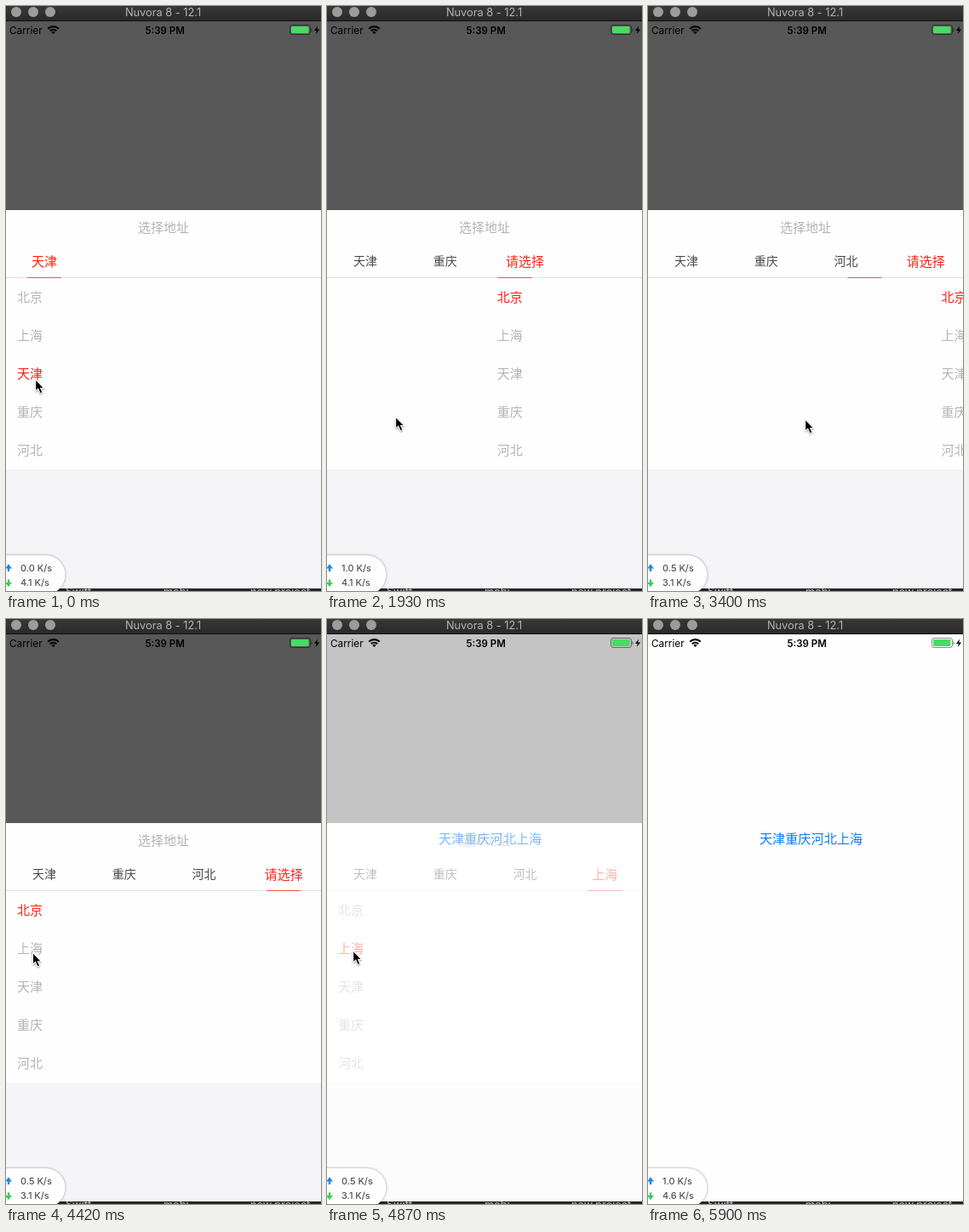
Recreate the animation shown at these times as an HTML page with a canvas. Size 370 px wide and 688 px high, loop 6050 ms.

```html
<!DOCTYPE html>
<html lang="zh">
<head>
<meta charset="utf-8">
<title>选择地址</title>
<style>
  html, body { margin: 0; width: 100%; height: 100%; overflow: hidden; background: #fefefe; }
  canvas { display: block; width: 370px; height: 688px; }
</style>
</head>
<body>
<canvas id="stage"></canvas>
<script>
const W = 370, H = 688, LOOP = 6050;
const STEP = 147.5;                  // the picture refreshes once per step
const SLIDE = 297, MARKER = 190, FADE = 300;
const canvas = document.getElementById('stage');
const ctx = canvas.getContext('2d');
const ratio = window.devicePixelRatio || 1;
canvas.width = W * ratio;
canvas.height = H * ratio;

const LATIN = 'Inter, "Liberation Sans", sans-serif';
const CJK = '"Noto Sans CJK SC", "Noto Sans CJK", "Noto Sans CJK JP", sans-serif';
const RED = '#ff2218', GREY = '#b4b4b4';
const CITIES = ['北京', '上海', '天津', '重庆', '河北'];
const PROMPT = '请选择';

// One pick per level: the row, the step it happens on, the wait before the sheet moves.
const PICKS = [
  { row: 2, at: 0, wait: 33 },
  { row: 3, at: 12 * STEP, wait: 0 },
  { row: 4, at: 22 * STEP, wait: 88 },
  { row: 1, at: 32 * STEP, wait: Infinity }
];
const CLOSE_AT = PICKS[3].at - 33;

// Key points of the pointer tip
const POINTER = [
  { t: 0, x: 35, y: 440 }, { t: 5 * STEP, x: 42, y: 447 },
  { t: 12 * STEP, x: 31, y: 479 }, { t: 13 * STEP, x: 81, y: 484 },
  { t: 16 * STEP, x: 47, y: 471 }, { t: 22 * STEP, x: 29, y: 522 },
  { t: 23 * STEP, x: 185, y: 487 }, { t: 29 * STEP, x: 32, y: 394 },
  { t: 33 * STEP, x: 31, y: 391 }, { t: 40 * STEP, x: 397, y: 733 }
];

const UP = ['0.0', '1.0', '0.5', '1.0'];
const DOWN = ['4.1', '4.1', '3.1', '4.6'];

const clamp = v => Math.max(0, Math.min(1, v));
const mix = (a, b, k) => a + (b - a) * k;
const ease = v => { v = clamp(v); return v * v * (3 - 2 * v); };
const tabX = i => 45 + i * 93.75;
const rowY = i => 342 + i * 45;

function rect(x, y, w, h, color) {
  ctx.fillStyle = color;
  ctx.fillRect(x, y, w, h);
}

function roundRect(x, y, w, h, r) {
  ctx.beginPath();
  ctx.roundRect(x, y, w, h, r);
}

function polygon(points, color) {
  ctx.beginPath();
  points.forEach(([x, y]) => ctx.lineTo(x, y));
  ctx.closePath();
  ctx.fillStyle = color;
  ctx.fill();
}

function text(str, x, y, size, color, { align = 'left', font = LATIN, weight = 400 } = {}) {
  ctx.font = `${weight} ${size}px ${font}`;
  ctx.textAlign = align;
  ctx.fillStyle = color;
  ctx.fillText(str, x, y);
}

// Chinese text placed by its vertical middle
function hanzi(str, x, midY, size, color, align = 'center') {
  text(str, x, midY + size * 0.38, size, color, { align, font: CJK });
}

function drawTitleBar() {
  const shade = ctx.createLinearGradient(0, 0, 0, 17);
  shade.addColorStop(0, '#383838');
  shade.addColorStop(1, '#2a2a2a');
  rect(0, 0, W, 17, shade);
  rect(0, 17, W, 1, '#111');
  for (let i = 0; i < 3; i++) {
    ctx.beginPath();
    ctx.arc(12 + i * 20, 7, 6, 0, 7);
    ctx.fillStyle = '#9c9c9c';
    ctx.fill();
  }
  text('Nuvora 8 - 12.1', 184.5, 12, 12.8, '#b4b4b4', { align: 'center' });
}

function drawWifi(x, y) {
  const from = -Math.PI * 0.75, to = -Math.PI * 0.25;
  ctx.strokeStyle = ctx.fillStyle = '#000';
  ctx.lineWidth = 2.2;
  for (const r of [5.2, 8.8]) {
    ctx.beginPath();
    ctx.arc(x, y, r, from, to);
    ctx.stroke();
  }
  ctx.beginPath();
  ctx.moveTo(x, y);
  ctx.arc(x, y, 3, from, to);
  ctx.fill();
}

function drawBattery() {
  const shell = 'rgba(0,0,0,.45)';
  roundRect(333.5, 22.5, 24, 11, 2.6);
  ctx.strokeStyle = shell;
  ctx.lineWidth = 1;
  ctx.stroke();
  roundRect(335, 24, 20.5, 8, 1.4);
  ctx.fillStyle = '#4cd964';
  ctx.fill();
  rect(358.3, 26.5, 1.2, 3.4, shell);
  polygon([[366.2, 23.5], [362, 29], [364.8, 29], [363.8, 33], [368.2, 27.4], [365.3, 27.4]], '#000');
}

function drawStatusBar() {
  text('Carrier', 4, 32.5, 11.8, '#000');
  drawWifi(55.5, 33);
  text('5:39 PM', 186.7, 32.5, 11.5, '#000', { align: 'center', weight: 600 });
  drawBattery();
}

function drawSheet(t) {
  const level = PICKS.filter(p => p.at <= t).length - 1;
  const { row, at, wait } = PICKS[level];
  const elapsed = t - at - wait;
  const moved = elapsed > 0;
  const active = moved ? level + 1 : level;

  rect(0, 18, W, 222, 'rgba(0,0,0,.65)');
  rect(0, 240, W, 305, '#fefefe');
  rect(0, 545, W, H - 545, '#f5f5f7');
  hanzi('选择地址', 185, 260, 15, GREY);

  for (let i = 0; i < active; i++) {
    hanzi(CITIES[PICKS[i].row], tabX(i), 300, 14, '#4a4a4a');
  }
  hanzi(moved ? PROMPT : CITIES[row], tabX(active), 300, 15, RED);

  const marker = tabX(level + ease(elapsed / MARKER));
  rect(0, 319, W, 1, '#e2e2e2');
  rect(marker - 20, 319, 40, 1, '#ff5045');

  const shift = moved ? W * (1 - ease(elapsed / SLIDE)) : 0;
  const chosen = moved ? 0 : row;
  CITIES.forEach((city, i) => {
    hanzi(city, 13 + shift, rowY(i), 15, i === chosen ? RED : GREY, 'left');
  });
}

function drawAddress(t) {
  const address = PICKS.map(p => CITIES[p.row]).join('');
  ctx.globalAlpha = ease((t - CLOSE_AT) / 250);
  hanzi(address, 191.5, 258, 15.15, '#0a7dfa');
  ctx.globalAlpha = 1;
}

function drawDesktopEdge() {
  const style = { weight: 500 };
  ctx.save();
  ctx.beginPath();
  ctx.rect(0, 685, W, 3);
  ctx.clip();
  rect(0, 685, W, 3, '#252527');
  text('Swift', 70, 693, 12.5, '#b0b0b0', style);
  text('mobi', 185, 693, 12.5, '#b0b0b0', style);
  text('new project', 287, 693, 12.5, '#b0b0b0', style);
  ctx.restore();
}

function drawArrow(y, dir, color) {
  polygon([[-1.2, y + 0.6 * dir], [3, y - 4 * dir], [7.2, y + 0.6 * dir]], color);
  rect(1.8, y - 4, 2.4, 8, color);
}

function drawSpeed(t) {
  const reading = Math.floor((t + 115) / 1745);
  ctx.save();
  ctx.shadowColor = 'rgba(0,0,0,.4)';
  ctx.shadowBlur = 3 * ratio;
  roundRect(-40, 646, 109.5, 46, 23);
  ctx.fillStyle = '#fefefe';
  ctx.fill();
  ctx.restore();
  drawArrow(661, 1, '#1689e6');
  drawArrow(678.5, -1, '#35cf55');
  text(UP[reading] + ' K/s', 17, 665, 10.9, '#505050', { weight: 500 });
  text(DOWN[reading] + ' K/s', 17, 682, 10.9, '#505050', { weight: 500 });
}

function drawPointer(t) {
  const next = Math.max(1, POINTER.findIndex(p => p.t >= t));
  const a = POINTER[next - 1], b = POINTER[next];
  const k = clamp((t - a.t) / (b.t - a.t));
  ctx.save();
  ctx.translate(mix(a.x, b.x, k), mix(a.y, b.y, k));
  ctx.shadowColor = 'rgba(0,0,0,.35)';
  ctx.shadowBlur = 2 * ratio;
  ctx.shadowOffsetY = ratio;
  ctx.strokeStyle = '#fff';
  ctx.lineWidth = 2;
  const shape = [[0.2, 0.5], [0.2, 11.8], [2.9, 9.3], [5.5, 15], [7.3, 14.2], [4.8, 8.9], [8.5, 8.9]];
  polygon(shape, '#fff');
  ctx.stroke();
  ctx.shadowColor = 'transparent';
  polygon(shape, '#000');
  ctx.restore();
}

function draw(t) {
  ctx.setTransform(ratio, 0, 0, ratio, 0, 0);
  rect(0, 0, W, H, '#fefefe');
  drawAddress(t);
  const opacity = 1 - ease((t - CLOSE_AT) / FADE);
  if (opacity > 0) {
    ctx.globalAlpha = opacity;
    drawSheet(t);
    ctx.globalAlpha = 1;
  }
  drawTitleBar();
  drawStatusBar();
  drawDesktopEdge();
  drawSpeed(t);
  drawPointer(t);
}

const start = performance.now();
function tick() {
  const t = (performance.now() - start) % LOOP;
  draw(Math.min(40, Math.floor((t + 10) / STEP)) * STEP);
  requestAnimationFrame(tick);
}
tick();
</script>
</body>
</html>
```
